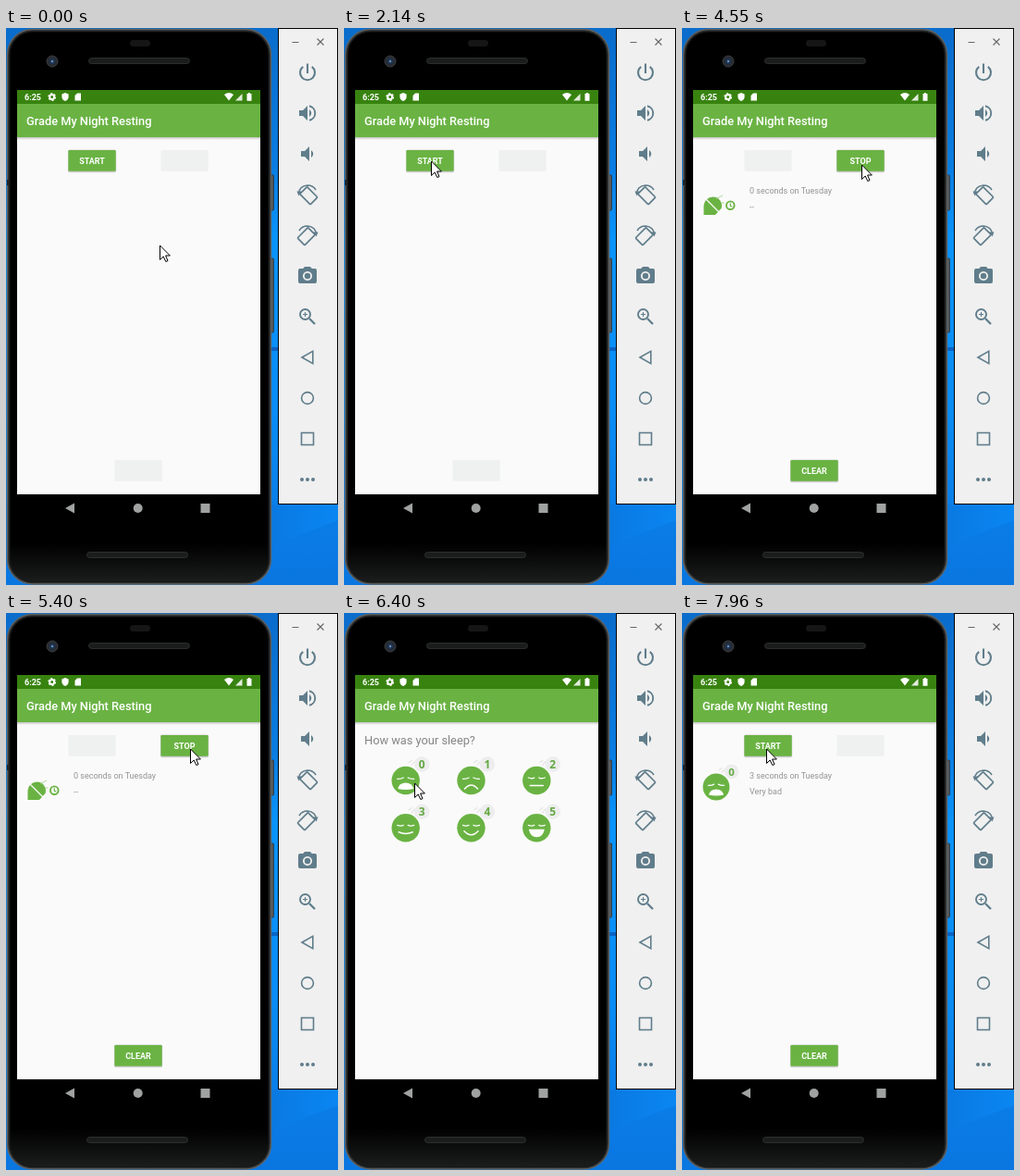
Recreate the animation shown at these times as an HTML page. Size 359 px wide and 602 px high, loop 8 s.

```html
<!DOCTYPE html>
<html lang="en">
<head>
<meta charset="utf-8">
<title>Sleep tracker</title>
<style>
html, body { margin: 0; width: 100%; height: 100%; overflow: hidden; background: #0a7ae2; }
svg { display: block; width: 359px; height: 602px; font-family: Roboto, sans-serif; }
.tool { stroke: #607d8b; fill: none; stroke-width: 1.9; }
.solid { fill: #607d8b; stroke: none; }
.label { font-size: 9px; font-weight: 700; fill: #fff; text-anchor: middle; }
.note { font-size: 9px; fill: #949494; }
.green { fill: #6ab343; }
.line { fill: none; stroke: #fff; stroke-width: 1.6; stroke-linecap: round; }
</style>
</head>
<body>
<svg id="stage" viewBox="0 0 359 602" xmlns="http://www.w3.org/2000/svg">
  <defs>
    <linearGradient id="sky" x1="0" y1="0" x2="0" y2="1">
      <stop offset="0" stop-color="#0a6ccb"/><stop offset=".25" stop-color="#0a7de2"/>
      <stop offset=".38" stop-color="#0a94fa"/><stop offset=".7" stop-color="#0a8cf4"/>
      <stop offset=".86" stop-color="#0a7ee8"/><stop offset="1" stop-color="#0a76e0"/>
    </linearGradient>
    <linearGradient id="beam" x1="0" y1="0" x2="1" y2="0">
      <stop offset="0" stop-color="#0a78e0"/><stop offset="1" stop-color="#0a86f2"/>
    </linearGradient>
    <linearGradient id="body" x1="0" y1="0" x2="0" y2="1">
      <stop offset=".93" stop-color="#000"/><stop offset="1" stop-color="#1b1c1c"/>
    </linearGradient>
    <linearGradient id="drop" x1="0" y1="0" x2="0" y2="1">
      <stop offset="0" stop-color="#000" stop-opacity=".22"/><stop offset="1" stop-color="#000" stop-opacity="0"/>
    </linearGradient>
    <clipPath id="screen"><rect x="12" y="67" width="263" height="437"/></clipPath>
  </defs>

  <rect width="359" height="602" fill="url(#sky)"/>
  <path d="M280 515H359V532L280 562Z" fill="url(#beam)"/>
  <rect x="285" y="345" width="10" height="4" fill="#0a63c6"/>

  <!-- phone body -->
  <g fill="#55585a" stroke="#222" stroke-width=".6">
    <rect x="285" y="159" width="4.5" height="38" rx="1"/>
    <rect x="285" y="249" width="4.5" height="80" rx="1"/>
  </g>
  <rect x="1.5" y="1.5" width="285" height="599.5" rx="27" fill="#2b2d2d" stroke="#5d6060" stroke-width="1.4"/>
  <rect x="4" y="4" width="280" height="594.5" rx="24.5" fill="url(#body)" stroke="#161717"/>
  <path d="M1 164h3v6h-3z" fill="#222"/>
  <rect x="134" y="13" width="22" height="7" rx="3.5" fill="#161616"/>
  <circle cx="50" cy="36" r="6" fill="#282c31" stroke="#3a3d41"/>
  <circle cx="50" cy="36" r="3.2" fill="#1d3350"/><circle cx="50" cy="36" r="1.2" fill="#6f8fb5"/>
  <g fill="#1b1c1c" stroke="#343535" stroke-width=".8">
    <rect x="89.5" y="32.5" width="109" height="6" rx="3"/>
    <rect x="87.5" y="566.5" width="109" height="6" rx="3"/>
  </g>
  <g fill="#a0a2a2">
    <path d="M64 519L74 513.5V524.5Z"/><circle cx="142.7" cy="519" r="5"/><rect x="210.5" y="514" width="10" height="10"/>
  </g>

  <!-- app screen -->
  <rect x="12" y="67" width="263" height="437" fill="#fafafa"/>
  <g clip-path="url(#screen)">
    <g id="home">
      <g id="start"></g><g id="stop"></g><g id="clear"></g>
      <g id="row">
        <text class="note" id="length" x="73" y="179"></text>
        <text class="note" id="mood" x="73" y="196"></text>
        <g id="asleep">
          <path class="green" d="M23.5 202V192A10 10 0 0 1 33.5 182.5A9.5 9.5 0 0 1 42.5 195L36 202Z"/>
          <path d="M24.5 183.5L42.5 201.5" stroke="#fafafa" stroke-width="1.2"/>
          <path d="M37 184.5L44 181M42.5 189h3" stroke="#9ccb83" stroke-width=".8"/>
          <circle cx="52.3" cy="191.7" r="4.3" fill="#fafafa" stroke="#6ab343" stroke-width="1.9"/>
          <path d="M52.3 189.2v3l2 1" fill="none" stroke="#6ab343" stroke-width="1.2"/>
        </g>
        <g id="result"></g>
      </g>
    </g>
    <g id="quiz">
      <text x="22" y="141.5" font-size="12.8" fill="#858585">How was your sleep?</text>
      <g id="faces"></g>
    </g>
  </g>
  <rect x="12" y="118" width="263" height="3" fill="url(#drop)"/>
  <rect x="12" y="67" width="263" height="15" fill="#388310"/>
  <rect class="green" x="12" y="82" width="263" height="36"/>
  <text x="22" y="105" font-size="12.8" font-weight="500" fill="#fff">Grade My Night Resting</text>
  <g fill="#fff">
    <text x="20" y="78" font-size="9" font-weight="700">6:25</text>
    <circle cx="49.7" cy="74.5" r="2.5" fill="none" stroke="#fff" stroke-width="2"/>
    <circle cx="49.7" cy="74.5" r="3.8" fill="none" stroke="#fff" stroke-width="1.2" stroke-dasharray="2 1.98"/>
    <path d="M64 70L67.6 71.5V74.5Q67.4 77.5 64 79Q60.6 77.5 60.4 74.5V71.5Z"/>
    <path d="M77 70.5H81V78.5H74.5V73Z"/>
    <path d="M236 72Q241 68 246 72L241 78.5Z"/>
    <path d="M248 78.5L255.5 71V78.5Z" opacity=".85"/>
    <path d="M260.5 71h1.4v-1h2.2v1h1.4v7.8h-5z"/>
  </g>

  <!-- side toolbar -->
  <rect x="294.5" y=".5" width="64" height="514" fill="#f0f0f0" stroke="#000"/>
  <path d="M309.5 15.5h7M336.5 11.5l7 7M343.5 11.5l-7 7" stroke="#666" stroke-width="1.1"/>
  <g id="tools" class="tool"></g>

  <circle id="click" r="12" fill="#ff0" fill-opacity=".47"/>
  <path id="cursor" d="M.5 1V16.5L4.2 13L6.8 18.5L9 17.6L6.6 12H11.4Z" fill="#fff" stroke="#000" stroke-width="1"/>
</svg>
<script>
const LOOP = 8000, WIDTH = 263;
const el = id => document.getElementById(id);
const show = (id, on) => el(id).setAttribute('display', on ? 'inline' : 'none');
const place = (id, x, y) => el(id).setAttribute('transform', `translate(${x} ${y})`);

// Toolbar icons, each drawn around its own centre
const speaker = x => `<path class="solid" d="M${x} -3h4l5 -5v16l-5 -5h-4z"/>`;
const turn = `<rect x="-8" y="-5.5" width="16" height="11" rx="1" transform="translate(1.3 1.2) rotate(45)" stroke-width="1.7"/>
  <path d="M-9.5 -1Q-9 -9 0 -10Q6 -10 9 -5" stroke-width="1.6"/><path class="solid" d="M-11.5 -3.5h5.5l-3.5 5z"/>`;
const icons = [
  '<path d="M0 -9.5V1M-4.8 -6.2A8 8 0 1 0 4.8 -6.2" stroke-width="2.1"/>',
  speaker(-9) + '<path class="solid" d="M2 -4Q6.5 0 2 4z"/><path d="M2 -7.8A8 8 0 0 1 2 7.8"/>',
  speaker(-7) + '<path class="solid" d="M4 -4Q8.5 0 4 4z"/>',
  turn,
  `<g transform="scale(-1 1)">${turn}</g>`,
  `<path class="solid" fill-rule="evenodd" d="M-3 -10h6l1.8 2H8q2 0 2 2V6q0 2 -2 2H-8q-2 0 -2 -2V-6q0 -2 2 -2h3.2z
    M0 -5a5 5 0 1 0 .01 0z"/><circle class="solid" r="3.2"/>`,
  '<circle cx="-2.5" cy="-2.5" r="5.5"/><path d="M2 2L8 8" stroke-width="2.3"/><path d="M-5 -2.5h5M-2.5 -5v5" stroke-width="1.1"/>',
  '<path d="M-6 0L5.8 -6.6V6.6Z" stroke-width="1.6"/>',
  '<circle r="6.4" stroke-width="1.6"/>',
  '<rect x="-6.5" y="-6.5" width="13" height="13" stroke-width="1.6"/>',
  [-6, 0, 6].map(x => `<circle class="solid" cx="${x}" r="2"/>`).join('')
];
el('tools').innerHTML = icons.map((d, i) => `<g transform="translate(326 ${48 + 44 * i})">${d}</g>`).join('');

// Buttons
const buttons = { start: [67.4, 132], stop: [167.4, 132], clear: [117.4, 467] };
for (const id in buttons) {
  const [x, y] = buttons[id];
  const box = name => `<rect class="${name}" x="${x}" y="${y}" width="51.3" height="22.8" rx="1.3"`;
  el(id).innerHTML = `${box('off')} fill="#eff0f0"/>
    <g class="on"><rect class="shade" x="${x - .5}" y="${y - .4}" width="52.3" height="24.6" rx="1.8" fill="#000" fill-opacity=".18"/>
    ${box('green')}/>${box('press')} fill="#000"/>
    <text class="label" x="${x + 25.6}" y="${y + 14.6}">${id.toUpperCase()}</text></g>`;
}
function setButton(id, on, press = 0) {
  const part = name => el(id).querySelector('.' + name);
  part('on').setAttribute('display', on ? 'inline' : 'none');
  part('off').setAttribute('display', on ? 'none' : 'inline');
  part('press').setAttribute('fill-opacity', press * .14);
  part('shade').setAttribute('transform', `translate(0 ${press * 2})`);
}

// Faces from very bad to excellent
const mouths = [
  '<path d="M-8.5 9Q-7 2.5 0 2.5T8.5 9Q0 11 -8.5 9Z" fill="#fff"/>',
  '<path class="line" d="M-7 9Q0 1 7 9"/>',
  '<path class="line" d="M-7 5.5H7"/>',
  '<path class="line" d="M-7.5 4.5Q0 8 7.5 4.5"/>',
  '<path class="line" d="M-7.5 3.5Q0 11.5 7.5 3.5"/>',
  '<path d="M-8.5 1.5H8.5Q7 10 0 10T-8.5 1.5Z" fill="#fff"/>'
];
function face(n, x, y, size = 1) {
  const lift = n < 2 ? 1.3 : 0;
  return `<g transform="translate(${x} ${y}) scale(${size})">
    <circle class="green" r="15.2"/>
    <path class="line" style="stroke-width:1.3" d="M-9 ${-3 + lift}Q-5 -1.5 -2.5 -3M9 ${-3 + lift}Q5 -1.5 2.5 -3"/>${mouths[n]}
    <path d="M3 -19l4 -3M6 -16l4 -5" stroke="#e3e4e3" stroke-width="1.2"/>
    <circle cx="17.5" cy="-17.5" r="8.2" fill="#ededee"/>
    <text x="17.5" y="-13" text-anchor="middle" font-family="'Open Sans', sans-serif" font-weight="700" font-size="12" fill="#64a843">${n}</text></g>`;
}
el('faces').innerHTML = mouths.map((_, n) => face(n, 66.7 + 70.8 * (n % 3), n < 3 ? 181 : 232.3)).join('');
el('result').innerHTML = face(0, 37, 188, .95);

// Pointer legs: start, end, steps, x, y, slow-down power
const legs = [
  [70, 70, 1, 165, 234, 1], [360, 1130, 11, 94, 144, 1.6], [1210, 1210, 1, 94, 143, 1],
  [2760, 2910, 3, 127, 200, 1], [3380, 3540, 3, 153, 183, 1], [3610, 4150, 8, 192, 148, 1.5],
  [4550, 4700, 3, 199, 145, 1], [5400, 5400, 1, 199, 146, 1], [5480, 5940, 7, 171, 177, 1],
  [6020, 6170, 3, 153, 181, 1], [6250, 6480, 4, 71, 183, 2], [7570, 7960, 6, 91, 146, 1.3]
];
function pointer(t) {
  let x = 166, y = 234;
  for (const [from, to, steps, tx, ty, power] of legs) {
    if (t < from) break;
    const gap = (to - from) / (steps - 1) || 1;
    const done = Math.min(1, (Math.floor((t - from) / gap + .05) + 1) / steps);
    const p = 1 - (1 - done) ** power;
    x += (tx - x) * p;
    y += (ty - y) * p;
  }
  return [Math.round(x), Math.round(y)];
}

const within = (t, a, b) => t >= a && t < b;

function slide(t) {
  const tick = 5400 + 77 * Math.floor((t - 5399) / 77);
  const p = Math.min(1, Math.max(0, (tick - 5666) / 400));
  return WIDTH * (1 + Math.cos(Math.PI * p)) / 2;
}

function draw(t) {
  const quiz = within(t, 5630, 7110), rated = t >= 7110, running = within(t, 2220, 5630);
  const [x, y] = pointer(t);
  place('cursor', x, y);
  place('click', x, y);
  show('click', within(t, 1760, 1910) || within(t, 5020, 5170) || within(t, 6710, 6780));

  show('home', !quiz);
  show('quiz', quiz);
  place('quiz', slide(t), 0);
  setButton('start', !running, within(t, 1910, 2070) ? 1 : 0);
  setButton('stop', running, within(t, 5095, 5170) ? .5 : 0);
  setButton('clear', running || rated);

  show('row', within(t, 2600, 5630) || t >= 7190);
  show('asleep', !rated);
  show('result', rated);
  el('length').textContent = `${rated ? 3 : 0} seconds on Tuesday`;
  el('mood').textContent = rated ? 'Very bad' : '--';
}

function tick() {
  draw(performance.now() % LOOP);
  requestAnimationFrame(tick);
}
tick();
</script>
</body>
</html>
```
